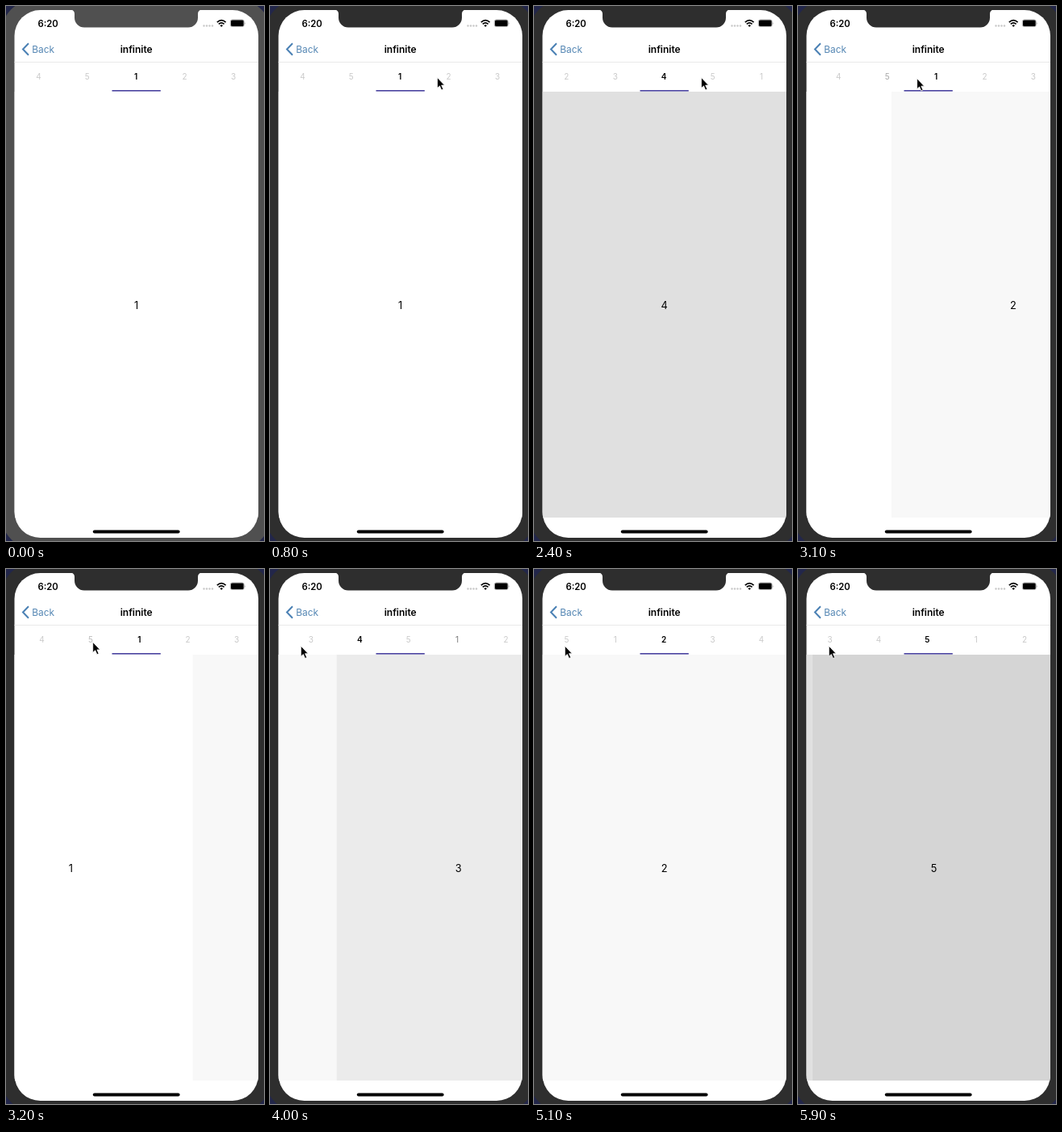
An HTML page for the animation above (6 s loop, 320x662 px).

```html
<!DOCTYPE html>
<html lang="en">
<head>
<meta charset="utf-8">
<title>Infinite tabs</title>
<style>
  html, body { margin: 0; width: 100%; height: 100%; overflow: hidden; background: #22264a; }
  svg { display: block; width: 100%; height: 100%; }
  text { font-family: Inter, Roboto, sans-serif; }
  .bold { font-weight: 600; }
  .mid { text-anchor: middle; }
</style>
</head>
<body>
<svg viewBox="0 0 320 662">
  <defs>
    <clipPath id="screen"><rect x="10.5" y="5" width="302.5" height="653" rx="32"/></clipPath>
  </defs>
  <rect id="bezel" x="-6" y="-8" width="335" height="680" rx="42"/>
  <rect x="10.5" y="5" width="302.5" height="653" rx="32" fill="#fff"/>

  <g clip-path="url(#screen)">
    <g id="pages"></g>
    <path d="M10 69.5H313" stroke="#e9e9e9"/>
    <g id="tabs" class="mid" font-size="10"></g>
    <rect x="131.5" y="104" width="60.3" height="1.6" fill="#4a43a0"/>
  </g>

  <path id="notch" d="M80 4.5A5 5 0 0 1 85 9.5V14.5A12 12 0 0 0 97 26.5H226A12 12 0 0 0 238 14.5V9.5A5 5 0 0 1 243 4.5Z"/>

  <text class="bold" x="39.5" y="25.6" font-size="11.3">6:20</text>
  <g fill="#c9c9c9">
    <circle cx="245.5" cy="24.5" r="1.2"/><circle cx="249" cy="24.5" r="1.2"/>
    <circle cx="252.5" cy="24.5" r="1.2"/><circle cx="256" cy="24.5" r="1.2"/>
  </g>
  <g fill="none" stroke="#000" stroke-width="1.7">
    <path d="M261.8 20.1Q267.2 15.3 272.6 20.1"/>
    <path d="M263.8 22.4Q267.2 19.3 270.6 22.4"/>
  </g>
  <path d="M265.4 24.1Q267.2 22.6 269 24.1L267.2 26Z"/>
  <rect x="278.3" y="17" width="17" height="8.6" rx="2.4" fill="none" stroke="#999" stroke-width=".8"/>
  <rect x="279" y="17.5" width="15.7" height="7.6" rx="1.6"/>
  <path d="M296.3 20V23Q297.6 21.5 296.3 20Z" fill="#999"/>

  <path d="M28 46.3L21 53.5L28 60.7" fill="none" stroke="#4a80b4" stroke-width="2"/>
  <text x="32.3" y="57.7" font-size="11.9" fill="#5587b4">Back</text>
  <text class="bold mid" x="161.7" y="57.6" font-size="12">infinite</text>

  <rect x="107.8" y="648.6" width="107.8" height="4" rx="2"/>
  <path id="cursor" d="M0 0V13L3 10.3L5.2 15.3L7.4 14.3L5.2 9.5H9Z" stroke="#fff" stroke-width=".8"/>
</svg>
<script>
const LOOP = 6000, STEP = 100, FOCUS = 700;
const CENTER = 161.7, PAGE_W = 302.5, TAB_W = 60.4, COUNT = 5;
const SETTLE = 113, DURATION = 600;
const COLORS = ['#ffffff', '#f8f8f8', '#ebebeb', '#e0e0e0', '#d5d5d5'];

// [tap time, tab to reach]; tabs run on endlessly, so 6 shows as 1 and 0 as 5
const TAPS = [[870, 2], [1350, 3], [1800, 4], [2410, 5], [2895, 6],
              [3900, 4], [4480, 2], [5350, 0]];
// [time, x, y]
const CURSOR = [[FOCUS, 207.5, 88.6], [2950, 207.5, 88.6], [3200, 107.7, 90.4],
                [3400, 72, 96], [3600, 38.3, 95.2], [LOOP, 38.3, 95.2]];

const byId = id => document.getElementById(id);
const wrap = n => ((n - 1) % COUNT + COUNT) % COUNT + 1;
const mix = (a, b, p) => a + (b - a) * p;
const ease = ms => ms >= DURATION ? 1 : 1 - Math.exp(-ms / SETTLE);

function add(parent, tag, attrs) {
  const el = document.createElementNS(parent.namespaceURI, tag);
  for (const key in attrs) el.setAttribute(key, attrs[key]);
  return parent.appendChild(el);
}

COLORS.forEach((fill, i) => {
  const x = 10.5 + i * PAGE_W;
  add(byId('pages'), 'rect', { x, y: 106, width: PAGE_W, height: 527, fill });
  add(byId('pages'), 'text', { x: CENTER + i * PAGE_W, y: 374.5, 'font-size': 12.8, class: 'mid' })
    .textContent = i + 1;
});
const labels = Array.from({ length: 7 }, () => add(byId('tabs'), 'text', { y: 91.2 }));

function selection(t) {
  let from = 1, to = 1, start = 0;
  for (const [time, tab] of TAPS) {
    if (t > time) [from, to, start] = [to, tab, time];
  }
  return { from, to, p: ease(t - start) };
}

// The chosen tab turns black at once; the previous one fades out.
function drawTabs({ from, to, p }) {
  const pos = mix(from, to, p), base = Math.round(pos);
  labels.forEach((label, i) => {
    const n = base + i - 3;
    const active = n === to ? 1 : n === from ? 1 - p : 0;
    const grey = Math.round(mix(202, 0, active));
    label.textContent = wrap(n);
    label.setAttribute('x', CENTER - 0.5 + (n - pos) * TAB_W);
    label.setAttribute('fill', `rgb(${grey},${grey},${grey})`);
    label.setAttribute('class', n === to ? 'bold' : '');
  });
}

function drawCursor(t) {
  byId('cursor').style.display = t < FOCUS ? 'none' : '';
  const i = CURSOR.findIndex(([time]) => time > t);
  if (i < 1) return;
  const [t0, x0, y0] = CURSOR[i - 1], [t1, x1, y1] = CURSOR[i];
  const p = (t - t0) / (t1 - t0);
  byId('cursor').setAttribute('transform', `translate(${mix(x0, x1, p)} ${mix(y0, y1, p)})`);
}

function draw(now) {
  const t = Math.floor(now % LOOP / STEP) * STEP;
  const shell = t < FOCUS ? '#505050' : '#2e2e2e';
  byId('bezel').setAttribute('fill', shell);
  byId('notch').setAttribute('fill', shell);

  const sel = selection(t);
  const page = mix(wrap(sel.from), wrap(sel.to), sel.p);
  byId('pages').setAttribute('transform', `translate(${(1 - page) * PAGE_W} 0)`);
  drawTabs(sel);
  drawCursor(t);
  requestAnimationFrame(draw);
}
draw(performance.now());
</script>
</body>
</html>
```
